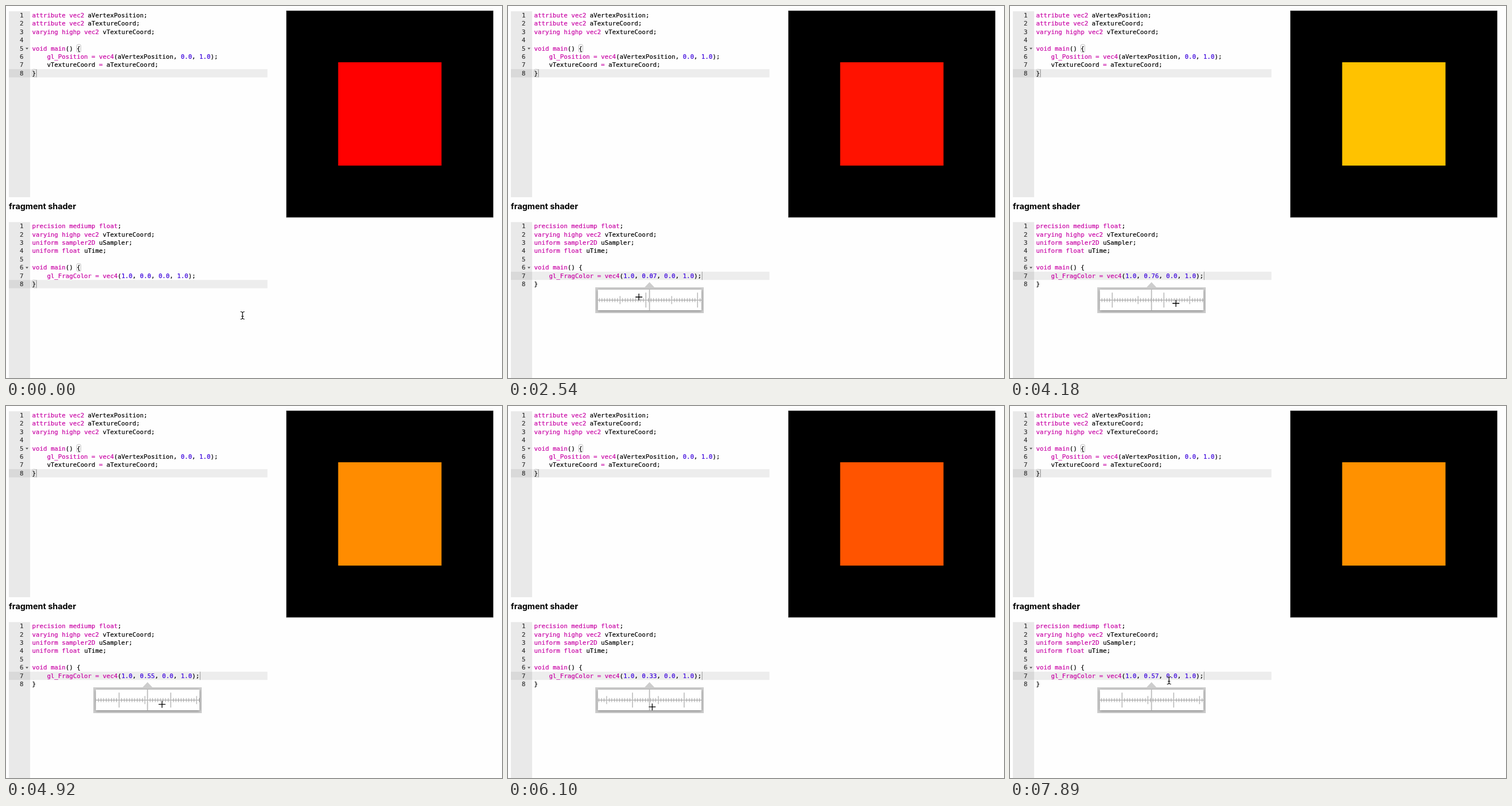
Write an HTML page that moves like this. It is 864 px wide and 648 px high and loops after 8 s.

```html
<!DOCTYPE html>
<html lang="en">
<head>
<meta charset="utf-8">
<title>Shader editor</title>
<style>
  html, body { margin: 0; width: 100%; height: 100%; overflow: hidden; background: #fefefe; }
  svg { display: block; width: 864px; height: 648px; }
  .code text { font: 10.764px "DejaVu Sans Mono", monospace; white-space: pre; fill: #000; stroke: #000; stroke-width: .2px; }
  .code .num { fill: #333; stroke: #333; text-anchor: end; }
  .code .k { fill: #c800a4; stroke: #c800a4; }
  .code .n { fill: #3a00dc; stroke: #3a00dc; }
  .title { font: 700 14.4px Inter, sans-serif; fill: #000; }
  .match { fill: none; stroke: #bfbfbf; }
  .caret { fill: #999; }
  .panel { filter: drop-shadow(0 1.8px 2.2px rgba(0, 0, 0, .4)); }
</style>
</head>
<body>
<svg viewBox="0 0 864 648">
  <defs>
    <clipPath id="window"><rect x="156.5" y="494" width="180.5" height="36"/></clipPath>
  </defs>
  <rect width="864" height="648" fill="#fefefe"/>
  <g id="vertex" class="code"></g>
  <text class="title" x="5" y="354">fragment shader</text>
  <g id="fragment" class="code"></g>
  <rect x="488" y="8" width="361" height="360.5" fill="#555"/>
  <rect x="489" y="8.6" width="359.4" height="359.2" fill="#000"/>
  <rect id="square" x="578.6" y="98" width="180" height="180"/>
  <g id="popup">
    <path d="M237.5 490.5L246.5 481L255.5 490.5Z" fill="#cdcdcd"/>
    <rect x="152" y="490" width="189" height="45" fill="#cdcdcd"/>
    <rect class="panel" x="156.5" y="494" width="180.5" height="36" fill="#fff"/>
    <g clip-path="url(#window)" fill="none">
      <path d="M156 512.3H338" stroke="#888" stroke-width=".9"/>
      <g id="scale">
        <path id="minor" stroke="#999" stroke-width=".9"/>
        <path id="half" stroke="#bbb" stroke-width="1.5"/>
        <path id="whole" stroke="#bbb" stroke-width="1.6"/>
      </g>
      <path d="M246.5 494V530" stroke="#bbb" stroke-width="1.8"/>
    </g>
  </g>
  <g id="pointer" fill="none">
    <g id="beam">
      <path d="M-3.5 -6.5Q0 -6.5 0 -4Q0 -6.5 3.5 -6.5M0 -5V5M-3.5 6.5Q0 6.5 0 4Q0 6.5 3.5 6.5M-2 1.5H2" stroke="#fff" stroke-width="2.6" stroke-opacity=".8"/>
      <path d="M-3.5 -6.5Q0 -6.5 0 -4Q0 -6.5 3.5 -6.5M0 -5V5M-3.5 6.5Q0 6.5 0 4Q0 6.5 3.5 6.5M-2 1.5H2" stroke="#000" stroke-width="1.2"/>
    </g>
    <g id="cross">
      <path d="M-6 0H6M0 -6V6" stroke="#fff" stroke-width="2.6" stroke-opacity=".8"/>
      <path d="M-6 0H6M0 -6V6" stroke="#000" stroke-width="1.3"/>
    </g>
  </g>
</svg>
<script>
const $ = id => document.getElementById(id);
const LOOP = 8000, STEP = 148.6;
const LINE = 14.4, CHAR = 6.48, LEFT = 45.5;
const CLICK = 10, UNIT = 90, CENTER = 246.5;

// [step, x, y]
const pointerKeys = [
  [1, 412, 539], [9, 246, 470], [12, 246, 470], [16, 222, 505], [17, 228, 507],
  [23, 267, 514], [28, 289, 518], [37, 258, 521], [39, 256, 525], [44, 244, 523],
  [48, 272, 522], [49, 272, 522], [53, 277, 478]
];
// [step, value]
const valueKeys = [
  [16, 0], [17, .07], [23, .5], [26, .72], [28, .76], [37, .39], [44, .29], [47, .56], [48, .57]
];

const vertexLines = [
  'attribute vec2 aVertexPosition;',
  'attribute vec2 aTextureCoord;',
  'varying highp vec2 vTextureCoord;',
  '',
  'void main() {',
  '    gl_Position = vec4(aVertexPosition, 0.0, 1.0);',
  '    vTextureCoord = aTextureCoord;',
  '}'
];
const fragmentLines = color => [
  'precision mediump float;',
  'varying highp vec2 vTextureCoord;',
  'uniform sampler2D uSampler;',
  'uniform float uTime;',
  '',
  'void main() {',
  color,
  '}'
];

function sample(keys, s) {
  if (s <= keys[0][0]) return keys[0].slice(1);
  const i = keys.findIndex(k => k[0] >= s);
  if (i < 0) return keys[keys.length - 1].slice(1);
  const a = keys[i - 1], b = keys[i], u = (s - a[0]) / (b[0] - a[0]);
  return a.slice(1).map((v, j) => v + (b[j + 1] - v) * u);
}

const highlight = line => line.replace(
  /\b(attribute|varying|uniform|precision|highp|mediump|void|main|float|vec[24]|sampler2D|gl_\w+)\b|=|\b\d+\.\d+\b/g,
  w => `<tspan class="${/^\d/.test(w) ? 'n' : 'k'}">${w}</tspan>`);

const rect = (x, y, w, h, attrs) =>
  `<rect x="${x}" y="${y}" width="${w}" height="${h}" ${attrs}/>`;

function editor(lines, top, bottom, active, caretColumn, foldLine, matched) {
  const y = i => top + (i - 1) * LINE;
  const bracket = (i, column) =>
    rect(LEFT + column * CHAR + .2, y(i) + .3, 6.8, 13.4, 'rx="1.8" class="match"');
  let out = rect(5, top, 37, bottom - top, 'fill="#e9e9e9"')
    + rect(5, y(active), 37, LINE, 'fill="#d9d9d9"')
    + rect(42, y(active), 413.5, LINE, 'fill="#ededed"');
  lines.forEach((line, i) => {
    const base = y(i + 1) + 10.7;
    out += `<text class="num" x="30.5" y="${base}">${i + 1}</text>`
      + `<text x="${LEFT}" y="${base}">${highlight(line)}</text>`;
  });
  out += `<path d="M34 ${y(foldLine) + 6}h5l-2.5 3z" fill="#555"/>`;
  if (matched) out += bracket(foldLine, 12) + bracket(lines.length, 0);
  return out + rect(LEFT + caretColumn * CHAR + .6, y(active), 1, LINE, 'class="caret"');
}

function ticks(spacing, half, skip) {
  let d = '';
  for (let i = -80; i <= 80; i++) {
    if (i % skip) d += `M${i * spacing} ${512.3 - half}v${half * 2}`;
  }
  return d;
}

function setup() {
  $('vertex').innerHTML = editor(vertexLines, 9.2, 333, 8, 1, 5, true);
  $('minor').setAttribute('d', ticks(4.5, 3.5, 10));
  $('half').setAttribute('d', ticks(UNIT / 2, 7, 2));
  $('whole').setAttribute('d', ticks(UNIT, 13, Infinity) + 'M0 499.3v26');
}

function draw(t) {
  const s = Math.floor(t / STEP);
  const clicked = s >= CLICK;
  const value = Math.round(sample(valueKeys, s)[0] * 100) / 100;
  const [x, y] = sample(pointerKeys, s);

  const label = value.toFixed(2).replace(/0$/, '');
  // A shortened number leaves the last character of the longer line behind.
  const rest = value > 0 && label.length < 4 ? ';' : '';
  const color = `    gl_FragColor = vec4(1.0, ${label}, 0.0, 1.0);${rest}`;
  $('fragment').innerHTML = editor(fragmentLines(color), 376.4, 648,
    clicked ? 7 : 8, clicked ? color.length : 1, 6, !clicked);

  $('square').setAttribute('fill', `rgb(255,${Math.round(value * 255)},0)`);
  $('popup').style.display = clicked ? '' : 'none';
  $('scale').setAttribute('transform', `translate(${CENTER - value * UNIT} 0)`);

  const scrubbing = clicked && y >= 490;
  $('beam').style.display = scrubbing ? 'none' : '';
  $('cross').style.display = scrubbing ? '' : 'none';
  $('pointer').setAttribute('transform', `translate(${x} ${y})`);
}

function loop() {
  draw(performance.now() % LOOP);
  requestAnimationFrame(loop);
}

setup();
loop();
</script>
</body>
</html>
```
